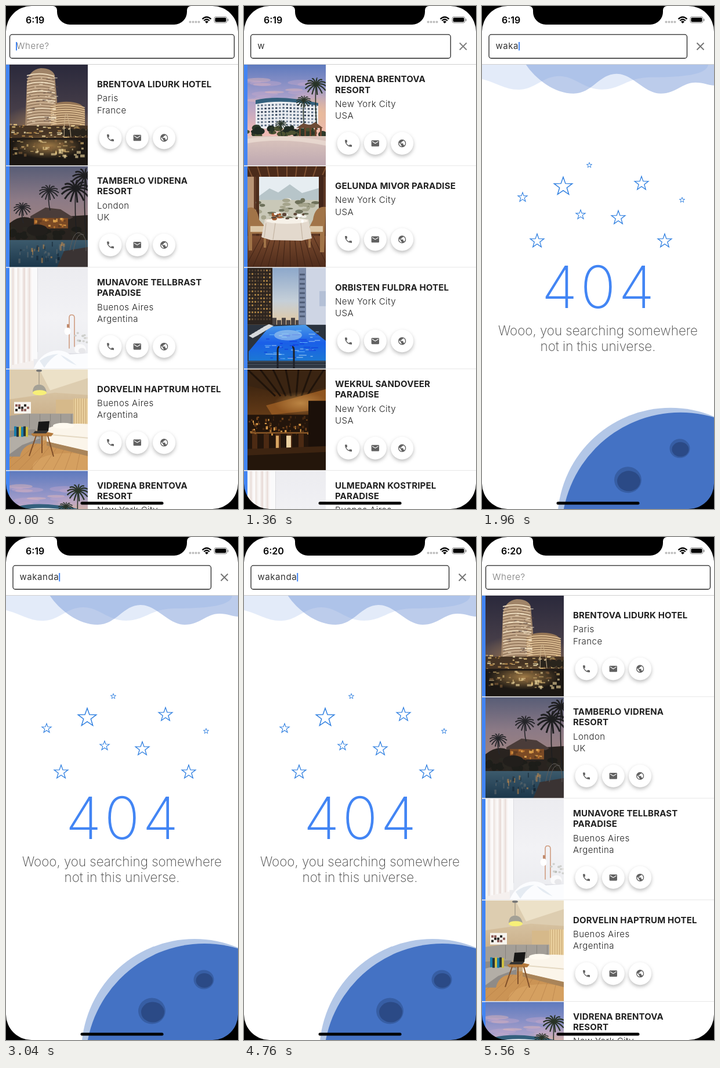
An HTML page that plays this animation: 400 by 866 pixels, repeating every 6.04 s.

```html
<!DOCTYPE html>
<html lang="en">
<head>
<meta charset="utf-8">
<title>Hotel search</title>
<style>
  html, body { margin: 0; width: 100%; height: 100%; overflow: hidden; background: #fff; }
  svg { display: block; }
  #stage { width: 100vw; height: 100vh; font-family: Inter, "Open Sans", sans-serif; }
  .title { font-size: 15px; font-weight: 700; letter-spacing: .15px; fill: #212121; }
  .body { font-size: 15px; font-weight: 350; letter-spacing: .45px; fill: #212121; }
  .input { font-size: 15px; font-weight: 400; letter-spacing: .55px; fill: #333; }
  .hint { font-weight: 350; fill: #777; }
  .clock { font-size: 16px; font-weight: 600; }
  .big { font-size: 101px; font-weight: 200; letter-spacing: 5px; fill: #4285f4; }
  .message { font-size: 22.4px; font-weight: 200; fill: #444; }
  .fab { filter: drop-shadow(0 3px 3px rgba(0, 0, 0, .26)); }
</style>
</head>
<body>
<svg id="stage" viewBox="0 0 400 866" preserveAspectRatio="none"></svg>
<script>
const LOOP = 6040, STEP = 40, BLUE = '#4285f4';

// Drawing helpers
const repeat = (n, fn) => Array.from({ length: n }, (_, i) => fn(i)).join('');
const rect = (x, y, w, h, fill, o = 1) =>
  `<rect x="${x}" y="${y}" width="${w}" height="${h}" fill="${fill}" opacity="${o}"/>`;
const backdrop = fill => rect(-3, -3, 141, 180, fill);
const oval = (x, y, rx, ry, fill, o = 1) =>
  `<ellipse cx="${x}" cy="${y}" rx="${rx}" ry="${ry}" fill="${fill}" opacity="${o}"/>`;
const shape = (d, fill, o = 1) => `<path d="${d}" fill="${fill}" opacity="${o}"/>`;
const line = (d, color, w = 1, o = 1) =>
  `<path d="${d}" fill="none" stroke="${color}" stroke-width="${w}" opacity="${o}"/>`;
const text = (cls, x, y, str, attrs = '') =>
  `<text class="${cls}" x="${x}" y="${y}" ${attrs}>${str}</text>`;
const gradient = (id, ...colors) =>
  `<linearGradient id="${id}" x2="0" y2="1">${colors.map((c, i) =>
    `<stop offset="${i / (colors.length - 1)}" stop-color="${c}"/>`).join('')}</linearGradient>`;
const glow = (id, color) =>
  `<radialGradient id="${id}"><stop stop-color="${color}"/><stop offset="1" stop-color="${color}" stop-opacity="0"/></radialGradient>`;

let seed = 7;
const random = (a, b) => {
  seed = (seed * 16807) % 2147483647;
  return +(a + (b - a) * seed / 2147483647).toFixed(1);
};
const pick = (...colors) => colors[Math.floor(random(0, colors.length - .1))];

const palm = (x, y, r, base, color) =>
  line(`M${x} ${y}Q${x - 2} ${(y + base) / 2} ${x + 2} ${base}`, color, 1.6) +
  repeat(13, i => {
    const a = i * Math.PI * 2 / 13, dx = r * Math.cos(a), dy = r * Math.sin(a) * .75;
    return line(`M${x} ${y}q${dx * .5} ${dy * .6 - r * .25} ${dx} ${dy + r * .15}`, color, r * .12);
  });

// Room pictures, each 135 by 174
const scenes = {
  city: () => backdrop('url(#night)') + oval(68, 108, 85, 42, 'url(#warm)', .6) +
    shape('M27 106L30 32Q33 9 54 6Q73 6 78 18L82 62V106Z', '#a08468') +
    shape('M70 106V74Q78 62 105 64Q127 66 130 78V106Z', '#967656') +
    repeat(18, i => line(`M30 ${19 + i * 5}Q52 ${12 + i * 5} ${77 + i / 4} ${20 + i * 4.8}`, i % 3 ? '#dfc5a4' : '#fff0d2', 2, .8)) +
    repeat(9, i => line(`M71 ${72 + i * 4}Q98 ${65 + i * 4} 130 ${74 + i * 3.7}`, '#f2d3a4', 1.8, .8)) +
    repeat(60, () => rect(random(30, 78), random(20, 100), random(2, 8), 1.5, pick('#5c4944', '#fff4d6'), .6)) +
    rect(0, 105, 135, 23, '#463424') +
    repeat(70, () => rect(random(0, 132), random(102, 125), random(2, 7), random(1, 3), pick('#f6d48a', '#ba8c4c', '#fff1bd'), .75)) +
    repeat(5, i => oval(97 + i * 10, 117, 6, 7, '#29241c')) +
    line('M94 126Q95 70 100 88T106 125', '#cdb48f', 1) +
    rect(0, 128, 135, 46, '#1b1713') + oval(66, 140, 62, 22, 'url(#warm)', .7) +
    repeat(65, () => rect(random(2, 126), random(129, 158), random(2, 9), random(1.5, 5), pick('#e9c57c', '#84603a', '#f7dfa4'), .6)) +
    rect(0, 126, 135, 3, '#211b17'),

  dusk: () => backdrop('url(#evening)') +
    shape('M0 98Q20 82 38 90L135 84V132H0Z', '#29231f') +
    shape('M36 86L62 71L88 74L110 88L104 91L36 90Z', '#4a3c39') +
    rect(42, 89, 59, 18, '#7b4a25') +
    repeat(26, () => rect(random(42, 98), random(89, 105), random(2, 5), random(2, 6), pick('#f2b457', '#c47a30', '#5a3820'), .8)) +
    repeat(30, () => oval(random(0, 135), random(106, 124), random(4, 9), random(3, 7), pick('#1d1d19', '#292620'))) +
    oval(48, 110, 18, 10, '#211e1b') +
    palm(68, 43, 17, 76, '#26262a') + palm(22, 72, 15, 98, '#26262a') +
    palm(114, 40, 25, 120, '#1e1e20') + palm(130, 18, 22, 124, '#1e1e20') +
    rect(0, 127, 135, 50, 'url(#pond)') +
    repeat(40, () => rect(random(15, 95), random(130, 160), random(1, 4), random(3, 10), pick('#d89249', '#101f2c', '#6f7273'), .5)) +
    shape('M82 174L94 146L135 139V177H80Z', '#3a3333') +
    line('M104 145Q110 110 122 115T132 146M110 146Q116 112 128 118', '#605c5a', 1),

  white: () => backdrop('url(#wall)') +
    rect(-3, 0, 45, 174, '#f5f0ee') +
    repeat(9, i => rect(i * 4.7, 0, 1.5 + i % 3, 168 - i, i % 2 ? '#e6d8d2' : '#fff', .7)) +
    rect(40, -3, 8, 160, '#fafafb') + rect(48, 0, 1, 145, '#dcdce0') +
    line('M103 139V86Q103 81 107 81Q112 81 112 86V136', '#cf9c80', 1.6) +
    oval(100, 109, 5.5, 6.5, '#fff') + line('M101 97V103', '#c08a6c', 4) +
    repeat(12, () => oval(random(113, 134), random(112, 132), 2.2, 1.8, pick('#cfd0cd', '#e4e2df', '#b9bcb6'))) +
    oval(122, 140, 10, 8.5, '#fafafb') + oval(125, 143, 6, 5, '#dadbe0', .6) + rect(98, 147, 40, 6, '#dcdde3') +
    shape('M40 177Q52 148 76 143Q92 140 104 149L138 147V177Z', '#fbfcfe') +
    shape('M52 160Q64 150 84 148Q70 156 60 172ZM88 150Q100 154 116 168Q98 162 88 150Z', '#dce4ee', .7),

  bedroom: () => backdrop('url(#beige)') +
    shape('M-3 -3H138V44L78 40L-3 52Z', '#ddcdb0') + shape('M50 -3H138V14L70 36Z', '#f1e6cf', .8) +
    line('M51 0V26', '#8d8678', 1) + oval(51, 2, 5, 2, '#777') +
    shape('M40 40Q40 26 51 26T64 40Z', '#a4a196') + oval(52, 40, 12, 4.5, '#f7ef78') +
    rect(8, 56, 29, 20, '#f7f4ee') + repeat(9, i => rect(10 + i % 5 * 5, 60 + i % 3 * 4, 4, 4, i % 2 ? '#272522' : '#8a5a55')) +
    rect(80, 52, 30, 40, '#d6b98a') +
    rect(110, 50, 28, 48, '#e9cf9c') + repeat(7, i => rect(111 + i * 4, 50, 1.2, 48, '#bf9d6a', .7)) +
    shape('M0 80L30 76H110V104H0Z', '#a39e97') + repeat(5, i => rect(34 + i * 18, 77, 1, 24, '#87837d')) +
    rect(-3, 122, 141, 56, '#cb9455') + oval(100, 168, 60, 24, '#e0ae6d', .5) +
    repeat(10, i => line(`M${i * 20 - 45} 174L${30 + i * 12} 122`, '#a87340', .8, .6)) +
    shape('M65 102Q88 91 138 94V142L64 124Z', '#fbf5ea') + shape('M64 124L138 141V150L64 131Z', '#a98459') +
    oval(93, 97, 18, 5, '#fffaf0') + line('M68 112L135 118', '#e4d8c2', 2) +
    shape('M-3 105L44 103L54 116V128Q24 124 18 150H-3Z', '#8f8b87') + shape('M-3 118Q28 108 54 118L22 130L-3 148Z', '#b3aea6') +
    repeat(6, i => rect(8 + i * 4, 98 + i % 2, 4, 17, ['#197daa', '#26343a', '#cfbf42'][i % 3])) +
    shape('M37 111Q54 104 76 110L72 115H41Z', '#b47a3c') +
    line('M46 114L34 149M66 114L76 150M56 114V144', '#80502a', 2) +
    shape('M50 90L69 89L67 106H48Z', '#171717') + shape('M44 106H67L63 110H41Z', '#333'),

  sunset: () => backdrop('url(#pink)') + oval(120, 84, 60, 46, 'url(#orange)', .8) +
    repeat(14, () => oval(random(5, 125), random(25, 68), random(12, 28), random(2, 5), pick('#f3bdb4', '#c6a9c9'), .4)) +
    shape('M14 66Q62 52 122 70V110H14Z', '#eceef2') +
    shape('M14 61Q55 51 122 66V71Q60 58 14 68Z', '#33607d') +
    repeat(7, r => repeat(17, c => rect(17 + c * 6.2, 67 + r * 5.8 + Math.abs(c - 7) * .25, 3.4, 3, pick('#56697f', '#7d8b9d', '#3f4d61')))) +
    repeat(34, () => oval(random(-2, 135), random(108, 122), random(3, 8), random(3, 7), pick('#2d3929', '#4c5232', '#1f2a22'))) +
    palm(118, 35, 19, 112, '#293428') + palm(97, 62, 13, 116, '#293428') + palm(58, 102, 10, 124, '#293428') +
    shape('M84 109L96 101L108 104L117 99L130 109Z', '#6d4b36') +
    repeat(5, i => rect(89 + i * 9, 108, 3, 16, '#6d442d')) +
    rect(-3, 123, 141, 54, 'url(#sand)') + shape('M-3 128Q70 118 138 132V140Q60 124 -3 136Z', '#ecdcd4', .8),

  dining: () => backdrop('#5d3825') + rect(16, 18, 112, 88, '#e6edf1') +
    shape('M16 54L38 38L53 45L73 31L94 46L128 36V70H16Z', '#b7c5c9') + rect(16, 58, 112, 47, '#c9c8b8') +
    repeat(36, () => oval(random(18, 125), random(56, 92), random(3, 8), random(1.5, 4), pick('#6d7059', '#efeee6', '#a5a48c'))) +
    rect(-3, -3, 141, 21, '#4b2b1a') + repeat(9, i => line(`M${i * 17} 0L${i * 15 + 8} 18`, '#7e5133', 2)) +
    rect(15, 15, 5, 110, '#4d2d1c') + rect(123, 15, 8, 112, '#43261a') + rect(-3, 18, 14, 60, '#b99576') +
    rect(-3, 120, 141, 57, 'url(#planks)') +
    repeat(12, i => line(`M${i * 13 - 4} 174L${25 + i * 8} 120`, '#3f2315', 1)) +
    shape('M0 72Q16 66 20 92L32 106V140H28V116H8V145H2Z', '#a17448') +
    shape('M135 70Q116 68 113 92L105 108V140H109V116H125V148H132Z', '#a17448') +
    rect(5, 103, 24, 10, '#dcc8a8') + rect(108, 103, 22, 10, '#dcc8a8') +
    shape('M30 91H105L111 124L93 128L40 127L24 122Z', '#e3d9cd') + oval(68, 94, 36, 5, '#f6f1e8') +
    line('M32 98L29 122M48 98L44 126M92 98L95 126', '#c6b7a6', 1.3) +
    repeat(20, () => oval(random(38, 98), random(82, 95), random(2, 5), random(1, 3), pick('#fff', '#a15b30', '#5d4637'))),

  pool: () => backdrop('url(#dawn)') +
    rect(-3, -3, 46, 101, '#2c241f') +
    repeat(15, r => repeat(8, c => rect(2 + c * 5, 3 + r * 6, 3, 3, pick('#a57e43', '#4a3b2d', '#695239')))) +
    repeat(6, i => rect(43 + i * 8, 86 + i % 2 * 4, 7, 14, '#4b4443')) +
    shape('M88 -3H138V112L88 98Z', '#7d8ca9') + shape('M101 -3H138V110L101 103Z', '#ced5e4') +
    repeat(10, i => rect(90, 10 + i * 8, 9, 3, '#4f5c76')) + rect(124, 40, 11, 26, '#b4c0d6') +
    rect(-3, 98, 141, 79, '#2b333e') + shape('M38 101L100 98L138 128V160H2V144Z', 'url(#water)') +
    repeat(55, () => rect(random(28, 118), random(104, 156), random(4, 14), 1.5, pick('#74c4ff', '#0d2cdc', '#b9dcf7'), .6)) +
    oval(70, 116, 24, 9, '#c2e0f2', .5) +
    repeat(6, i => shape(`M${2 + i * 5} ${117 - i * 3}l10 -5l8 3l-11 6z`, '#d6d9dc')) +
    repeat(3, i => rect(0, 161 + i * 5, 135, 1, '#515b66')) +
    line('M52 174V142Q52 136 55 136M80 174V142Q80 136 77 136', '#1e2026', 3),

  bar: () => backdrop('url(#amber)') +
    shape('M-3 -3H138V30L75 46L-3 27Z', '#3a2412') +
    repeat(7, i => line(`M${i * 22} 0L${48 + i * 9} 46`, '#1f130a', 3)) +
    shape('M32 62L135 34V68L42 78Z', '#8f5520') + oval(92, 58, 46, 20, 'url(#warm)', .6) +
    rect(-3, 78, 141, 60, '#23150b') +
    repeat(70, () => rect(random(2, 105), random(80, 110), random(1, 4), random(2, 6), pick('#d99a48', '#734219', '#452710'))) +
    rect(5, 108, 100, 2.5, '#8a5726') +
    repeat(5, i => rect(8 + i * 20, 111, 9, 26, '#4c2a13')) +
    rect(49, 114, 5, 25, '#d8a562') + rect(67, 114, 8, 25, '#ecd1a1') + rect(105, 54, 33, 90, '#1b1009') +
    shape('M-3 137L138 132V177H-3Z', '#3d2411') + shape('M-3 148L138 142V177H-3Z', '#24160b')
};

// Icon outlines on a 24 unit grid
const icons = [
  'M6.6 10.8c1.4 2.8 3.8 5.1 6.6 6.6l2.2-2.2c.3-.3.7-.4 1-.2 1.1.4 2.3.6 3.6.6.6 0 1 .4 1 1V20c0 .6-.4 1-1 1C10.6 21 3 13.4 3 4c0-.6.4-1 1-1h3.5c.6 0 1 .4 1 1 0 1.2.2 2.4.6 3.6.1.3 0 .7-.3 1z',
  'M20 4H4c-1.1 0-2 .9-2 2v12c0 1.1.9 2 2 2h16c1.1 0 2-.9 2-2V6c0-1.1-.9-2-2-2zm0 4l-8 5-8-5V6l8 5 8-5z',
  'M12 2a10 10 0 1 0 0 20a10 10 0 0 0 0-20zm-1 17.9A8 8 0 0 1 4.2 10.2L9 15v1a2 2 0 0 0 2 2zm6.9-2.5A2 2 0 0 0 16 16h-1v-3a1 1 0 0 0-1-1H8v-2h2a1 1 0 0 0 1-1V7h2a2 2 0 0 0 2-2v-.4a8 8 0 0 1 2.9 12.8z'
];

const fab = (icon, i, y) => {
  const x = 180 + i * 46.3;
  return `<circle class="fab" cx="${x}" cy="${y}" r="19.5" fill="#fff"/>` +
    `<path transform="translate(${x - 8} ${y - 8}) scale(.667)" d="${icon}" fill="#616161"/>`;
};

const row = ([scene, title, city, country], i) => {
  const top = 101 + i * 174.9, lines = title.split('|');
  const first = top + (lines.length > 1 ? 30 : 39), last = first + (lines.length - 1) * 18.5;
  return rect(0, top, 6, 174, BLUE) +
    `<use href="#${scene}" x="6" y="${top}" width="135" height="174"/>` +
    rect(0, top + 173.4, 400, 1, '#e6e6e6') +
    lines.map((s, n) => text('title', 157, first + n * 18.5, s)).join('') +
    text('body', 157, last + 24.3, city) + text('body', 157, last + 44.6, country) +
    icons.map((icon, n) => fab(icon, n, last + 87)).join('');
};

const sunsetRow = ['sunset', 'VIDRENA BRENTOVA|RESORT', 'New York City', 'USA'];
const allRows = [
  ['city', 'BRENTOVA LIDURK HOTEL', 'Paris', 'France'],
  ['dusk', 'TAMBERLO VIDRENA|RESORT', 'London', 'UK'],
  ['white', 'MUNAVORE TELLBRAST|PARADISE', 'Buenos Aires', 'Argentina'],
  ['bedroom', 'DORVELIN HAPTRUM HOTEL', 'Buenos Aires', 'Argentina'],
  sunsetRow
];
const foundRows = [
  sunsetRow,
  ['dining', 'GELUNDA MIVOR PARADISE', 'New York City', 'USA'],
  ['pool', 'ORBISTEN FULDRA HOTEL', 'New York City', 'USA'],
  ['bar', 'WEKRUL SANDOVEER|PARADISE', 'New York City', 'USA'],
  ['white', 'ULMEDARN KOSTRIPEL|PARADISE', 'Buenos Aires', 'Argentina']
];

const star = ([x, y, r]) => {
  const points = Array.from({ length: 10 }, (_, i) => {
    const a = i * Math.PI / 5, d = i % 2 ? r * .4 : r;
    return `${(x + d * Math.sin(a)).toFixed(1)},${(y + r * .07 - d * Math.cos(a)).toFixed(1)}`;
  });
  return `<polygon points="${points.join(' ')}" fill="none" stroke="#2b7de0" stroke-width="${.7 + r * .045}"/>`;
};
const stars = [[185, 274, 4.8], [140, 310, 16.5], [275, 305, 12.5], [70, 329, 8.5], [345, 334, 4.8],
  [170, 359, 8.5], [235, 364, 12.5], [95, 404, 12.5], [315, 404, 12.5]];

const notFound = rect(0, 80, 400, 800, '#fff') +
  shape('M75 100C92 126 125 151 158 151C190 151 202 117 232 117C260 117 280 151 308 151C335 151 345 132 368 132C382 132 391 137 400 137V70H55Z', '#bccceb') +
  shape('M0 126C25 132 42 146 67 144C93 142 106 121 133 121C160 121 176 144 207 144C242 143 248 124 290 123C345 123 390 119 390 100V70H0Z', '#7da0e0', .21) +
  stars.map(star).join('') +
  text('big', 202.5, 520, '404', 'text-anchor="middle"') +
  text('message', 200, 567, 'Wooo, you searching somewhere', 'text-anchor="middle"') +
  text('message', 200, 594, 'not in this universe.', 'text-anchor="middle"') +
  oval(325, 887, 195, 195, '#b3c7e7') + oval(342, 904.7, 204.7, 204.7, '#4472c4') +
  oval(251.5, 816, 23.5, 22.5, '#375ea4') + oval(253, 818, 20, 17.5, '#2b4a86') +
  oval(341, 762, 17.5, 16.5, '#375ea4') + oval(342, 763.5, 14.5, 12.5, '#2b4a86');

const statusBar = text('clock', 34, 29.5, '6:19', 'id="clock"') +
  repeat(4, i => oval(317.5 + i * 5, 27.5, 2, 2, '#bdbdbd')) +
  line('M338.5 22.5Q346 15.5 353.5 22.5M341.2 25.2Q346 20.8 350.8 25.2', '#000', 2.2) +
  shape('M343 27Q346 24.5 349 27L346 30Z', '#000') +
  '<rect x="359" y="18.5" width="22" height="10.5" rx="3" fill="none" stroke="#888"/>' +
  '<rect x="360.5" y="20" width="19" height="7.5" rx="1.8"/>' + rect(382, 22, 1.4, 4, '#888');

const bezel = '<path fill-rule="evenodd" d="M0 0H400V866H0ZM44 0A44 44 0 0 0 0 44V822A44 44 0 0 0 44 866H356A44 44 0 0 0 400 822V44A44 44 0 0 0 356 0Z"/>' +
  shape('M81 0A7 7 0 0 1 88 7V10A22 22 0 0 0 110 32H290A22 22 0 0 0 312 10V7A7 7 0 0 1 319 0Z', '#000') +
  '<rect x="128.5" y="853.5" width="143" height="5" rx="2.5"/>';

const stage = document.getElementById('stage');
stage.innerHTML = '<defs>' +
  gradient('night', '#29283b', '#49404a', '#6b5148') + gradient('evening', '#555b75', '#8c7a86', '#a4857e', '#5a5158') +
  gradient('pond', '#3c5a6c', '#193448') + gradient('wall', '#ececf0', '#f2f2f5', '#e9eaee') +
  gradient('beige', '#e2d3b6', '#c9ae88', '#bd9a6a') + gradient('pink', '#5a78bd', '#a9a0cb', '#efb9b4', '#efc4a4') +
  gradient('dawn', '#8aa6ca', '#c5cfd8', '#f3c684', '#8a6752') + gradient('amber', '#2b1a0c', '#683d18', '#24150b') +
  gradient('sand', '#dcc6bd', '#bca6b0') + gradient('planks', '#7a4a2e', '#4c2a1a') +
  gradient('water', '#4b9be8', '#1a5fe8', '#1b78d4') +
  glow('warm', '#d9a55c') + glow('orange', '#f6c08c') +
  '<filter id="soft"><feGaussianBlur stdDeviation=".6"/></filter>' +
  Object.entries(scenes).map(([id, draw]) =>
    `<symbol id="${id}" viewBox="0 0 135 174"><g filter="url(#soft)">${draw()}</g></symbol>`).join('') +
  '<clipPath id="reveal"><circle id="iris" cx="0" cy="100"/></clipPath></defs>' +
  rect(0, 0, 400, 866, '#fff') +
  `<g id="all">${allRows.map(row).join('')}</g><g id="found">${foundRows.map(row).join('')}</g>` +
  `<g id="lost" clip-path="url(#reveal)"><g id="drift">${notFound}</g></g>` +
  rect(0, 0, 400, 100, '#fff') + rect(0, 100, 400, 1, '#cfcfcf') +
  '<rect id="field" y="49.2" height="40.8" rx="4" fill="#fff" stroke="#222" stroke-width="1.3"/>' +
  text('input hint', 18, 74.2, 'Where?', 'id="hint"') + text('input', 24, 74.2, '', 'id="query"') +
  `<rect id="caret" y="62" width="2" height="14.5" fill="${BLUE}"/>` +
  '<circle id="ripple" cx="376.5" cy="69.5"/>' +
  `<g id="clear">${line('M-6 -6L6 6M6 -6L-6 6', '#757575', 1.9)}</g>` +
  statusBar + bezel;

const el = Object.fromEntries([...stage.querySelectorAll('[id]')].map(node => [node.id, node]));

// Tables of [start in ms, value]
const typed = [[0, ''], [1040, 'w'], [1480, 'wa'], [1600, 'wak'], [1840, 'waka'],
  [2160, 'wakan'], [2360, 'wakand'], [2520, 'wakanda'], [4800, '']];
const caretOn = [[0, 1], [520, 0], [960, 1], [1320, 0], [1440, 1], [2520, 0], [3040, 1],
  [3560, 0], [4040, 1], [4520, 0], [4760, 1], [4800, 0]];
const listShown = [[0, 'all'], [1080, 'found'], [1480, 'all']];

const at = (table, t) => table.findLast(([start]) => t >= start)[1];
const ramp = (t, start, duration) => Math.min(1, Math.max(0, (t - start) / duration));
const easeOut = (p, power) => 1 - (1 - p) ** power;
const set = (node, attrs) => Object.entries(attrs).forEach(([k, v]) => node.setAttribute(k, v));
const show = (node, on) => set(node, { visibility: on ? 'visible' : 'hidden' });

function render(t) {
  const open = easeOut(ramp(t, 1040, 540), 3) - easeOut(ramp(t, 4800, 480), 3);
  const left = 6.5 + 5.5 * open, right = 393.5 - 40 * open;
  set(el.field, { x: left, width: right - left });
  set(el.clear, { transform: `translate(${376.5 + 19 * (1 - open)} 69.5)`, opacity: open });

  const query = at(typed, t);
  if (el.query.textContent !== query) el.query.textContent = query;
  const start = left + 11.5;
  set(el.query, { x: start });
  set(el.hint, { x: start });
  show(el.hint, !query);
  set(el.caret, { x: query ? start + el.query.getComputedTextLength() : start - 1 });
  show(el.caret, at(caretOn, t));

  const list = at(listShown, t);
  show(el.all, list === 'all');
  show(el.found, list === 'found');

  const reveal = easeOut(ramp(t, 1560, 440), 2) - easeOut(ramp(t, 4800, 440), 2);
  set(el.iris, { r: 900 * reveal });
  set(el.lost, { opacity: .78 + .22 * reveal });
  set(el.drift, { transform: `translate(0 ${-20 * (1 - reveal)})` });
  show(el.lost, reveal > 0);

  const press = ramp(t, 4760, 440);
  set(el.ripple, { r: 29 * easeOut(press, 2), opacity: .12 * (1 - press) });

  const late = t >= 4520;
  el.clock.textContent = late ? '6:20' : '6:19';
  set(el.clock, { x: late ? 33 : 34 });
}

const origin = performance.now();
function tick() {
  const t = (performance.now() - origin) % LOOP;
  render(Math.floor(t / STEP) * STEP);
  requestAnimationFrame(tick);
}
tick();
</script>
</body>
</html>
```
